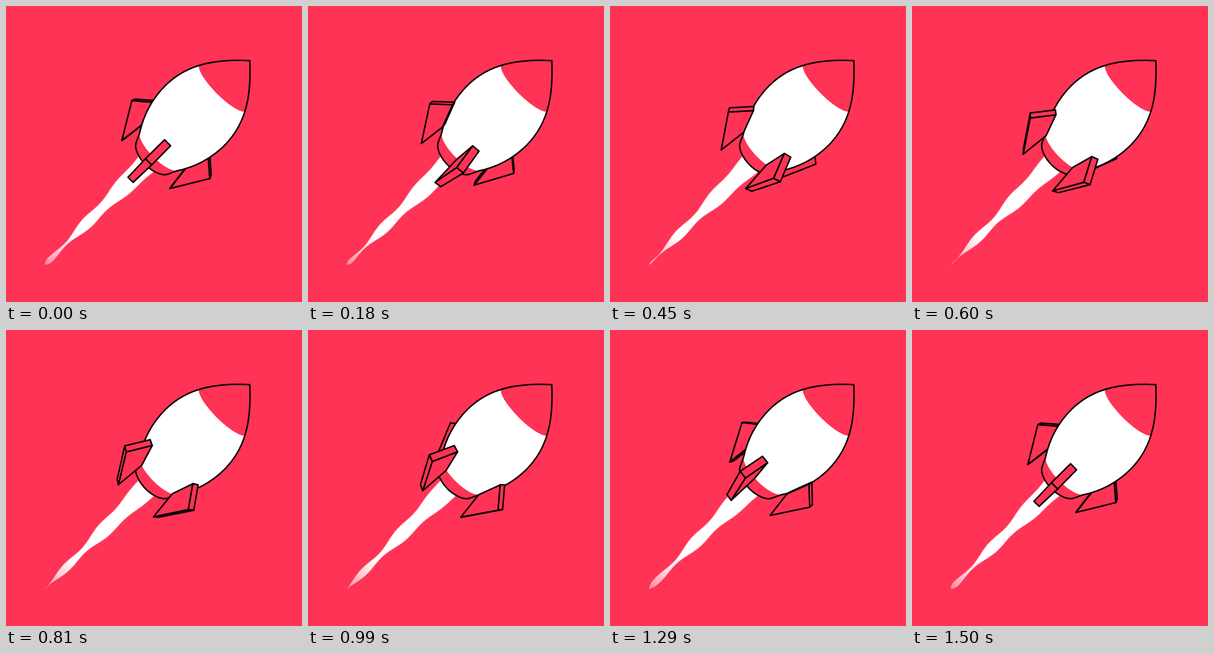
An HTML page with a canvas that plays this animation: 500 by 500 pixels, repeating every 1530 ms.

```html
<!DOCTYPE html>
<html>
<head>
<meta charset="utf-8">
<style>
  html, body { margin: 0; width: 100%; height: 100%; overflow: hidden; background: #ff3355; }
  canvas { display: block; }
</style>
</head>
<body>
<canvas id="stage" width="500" height="500"></canvas>
<script>
const ctx = document.getElementById('stage').getContext('2d');
const RED = '#ff3355';
const LOOP = 1530, STEP = 30, TURN = 1500;

// Rocket space: origin on the axis, nose towards -y, turned 45° on the stage.
const body = new Path2D(`M0-226C-37-192-71-152-71-95C-71-62-62-34-44.5-7
  C-42-2-40 4-37 9C-32 18-14 23 0 23C14 23 32 18 37 9C40 4 42-2 44.5-7
  C62-34 71-62 71-95C71-152 37-192 0-226Z`);
const nose = new Path2D('M-55-159C-40-143.5 40-143.5 55-159L80-240H-80Z');
const base = new Path2D('M-44.5-7C-30 8 30 8 44.5-7L60 40H-60Z');

// Fin profile as [radius, height], extruded to a thin plate.
const fin = [[58.4, 69], [85.4, 45.9], [58.8, -24], [49, 29]];
const HALF = 5.5, CAMERA = 371, TILT = Math.asin(0.577);

function project([radius, height], side, angle) {
  const x = radius * Math.sin(angle) + side * Math.cos(angle);
  const depth = radius * Math.cos(angle) - side * Math.sin(angle);
  const up = height * Math.cos(TILT) - depth * Math.sin(TILT);
  const near = height * Math.sin(TILT) + depth * Math.cos(TILT);
  const scale = CAMERA / (CAMERA - near);
  return [x * scale, -up * scale];
}

function trace(points) {
  ctx.beginPath();
  points.forEach(([x, y]) => ctx.lineTo(x, y));
  ctx.closePath();
}

function facesCamera(points) {
  return points.reduce((area, [x, y], i) => {
    const [nx, ny] = points[(i + 1) % points.length];
    return area + x * ny - nx * y;
  }, 0) > 0;
}

function drawFin(angle) {
  const left = fin.map(v => project(v, -HALF, angle));
  const right = fin.map(v => project(v, HALF, angle));
  const faces = [left, [...right].reverse()];
  fin.forEach((_, i) => {
    const j = (i + 1) % fin.length;
    faces.push([left[j], left[i], right[i], right[j]]);
  });
  ctx.fillStyle = RED;
  for (const face of faces.filter(facesCamera)) {
    trace(face);
    ctx.fill();
    ctx.stroke();
  }
}

function drawFlame(phase) {
  const top = 16, length = 246, wave = 91;
  const left = [], right = [];
  for (let y = top; y <= top + length; y += 3) {
    const u = 1 - (y - top) / length;
    const ripple = Math.cos(2 * Math.PI * ((y - 119) / wave - phase));
    const tip = Math.sqrt(Math.min(1, u / 0.04));
    const half = tip * Math.max(0, 2 + 16.5 * u ** 1.3 - 2.4 * (1 - u ** 4) * ripple);
    const middle = -0.8 * (1 - u);
    left.push([middle - half, y]);
    right.unshift([middle + half, y]);
  }
  const fade = ctx.createLinearGradient(0, 195, 0, top + length);
  fade.addColorStop(0, '#fff');
  fade.addColorStop(0.5, 'rgba(255,255,255,.75)');
  fade.addColorStop(1, 'rgba(255,255,255,.4)');
  ctx.save();
  trace([...left, ...right]);
  ctx.fillStyle = ctx.strokeStyle = fade;
  ctx.fill();
  ctx.globalAlpha = 0.3;
  ctx.lineWidth = 2;
  ctx.stroke();
  ctx.restore();
}

function drawBody() {
  ctx.save();
  ctx.fillStyle = '#fff';
  ctx.fill(body);
  ctx.clip(body);
  ctx.fillStyle = RED;
  ctx.fill(nose);
  ctx.fill(base);
  ctx.restore();
  ctx.stroke(body);
}

function draw(phase) {
  ctx.resetTransform();
  ctx.fillStyle = RED;
  ctx.fillRect(0, 0, 500, 500);
  ctx.translate(252, 252);
  ctx.rotate(Math.PI / 4);
  ctx.strokeStyle = '#000';
  ctx.lineWidth = 2.5;
  ctx.lineJoin = 'round';

  const angles = [0, 1, 2, 3].map(k => (phase + k) * Math.PI / 2);
  const inFront = angle => Math.cos(angle) > 0.15;
  drawFlame(phase);
  angles.filter(a => !inFront(a)).forEach(drawFin);
  drawBody();
  angles.filter(inFront).forEach(drawFin);
}

function tick() {
  const time = Math.floor(performance.now() % LOOP / STEP) * STEP;
  draw(time / TURN % 1);
  requestAnimationFrame(tick);
}
tick();
</script>
</body>
</html>
```
